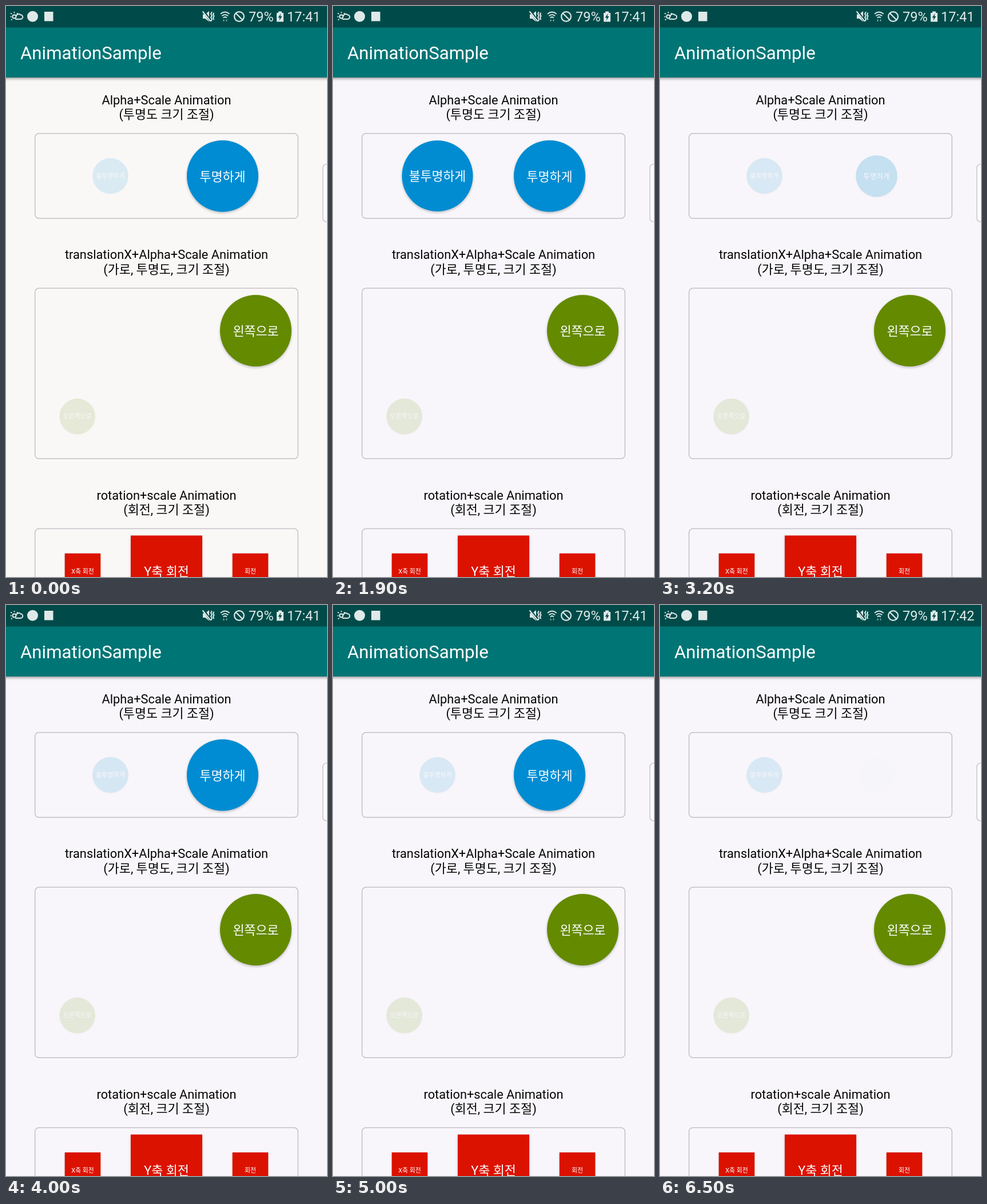
An HTML page that plays this animation: 561x998 px, repeating every 6600 ms.

```html
<!DOCTYPE html>
<html lang="ko">
<head>
<meta charset="utf-8">
<title>AnimationSample</title>
<style>
  html, body { margin: 0; width: 100%; height: 100%; overflow: hidden; background: #f8f6fa; }
  svg { display: block; width: 100%; height: 100%; }
  text { font: 21.8px Roboto, "Noto Sans CJK KR", "Noto Sans CJK", sans-serif; }
  .mid { text-anchor: middle; }
  .head { fill: #050505; }
  .label { fill: #fff; }
  .status { fill: #e2ebeb; font-size: 23.5px; }
  .icon { fill: none; stroke: #dfe9e9; stroke-width: 2; stroke-linecap: round; }
  .solid { fill: #dfe9e9; }
  .box { fill: none; stroke: #c3c1c5; stroke-width: 1.5; }
  .blue { fill: #008cd2; }
  .green { fill: #648a00; }
  .red { fill: #dc1200; }
  .lift { filter: drop-shadow(0 2.5px 2px rgba(0, 0, 0, .24)); }
  .bar { filter: drop-shadow(0 2px 2.5px rgba(0, 0, 0, .4)); }
</style>
</head>
<body>
<svg viewBox="0 0 561 998" preserveAspectRatio="none">
  <rect id="page" width="561" height="998" fill="#f8f6fa"/>

  <!-- app bar -->
  <rect class="bar" x="-10" width="581" height="125" fill="#007575"/>
  <rect width="561" height="37.5" fill="#004b49"/>
  <text x="25" y="93" fill="#fff" style="font-size:31.2px">AnimationSample</text>

  <!-- status icons -->
  <g class="icon">
    <circle cx="14.5" cy="18.5" r="3"/>
    <path d="M14.5 11v.6M9 13l.5.5M8.5 18.8h.3M9.6 24l.4-.4M20 13l-.4.4" />
    <path d="M17 23h8.5a3.6 3.6 0 0 0 0-7.5a4.6 4.6 0 0 0-7.6 1.6"/>
    <circle class="solid" cx="46.5" cy="18.3" r="8.5"/>
    <rect class="solid" x="68" y="11" width="13.5" height="14.5"/>
    <path class="solid" stroke="none" d="M344 14.5h4l7-5.5v18.500l-7-5.500h-4z"/>
    <path stroke="#004b49" stroke-width="4" d="M346 10l11 16"/>
    <path d="M344 10l13 16M359.500 11l-1.500 3l2 3l-2 3l2 3l-1.500 3M363 12.500l-1 2l1.500 3l-1.500 3l1 3"/>
    <path d="M375.500 13.500q7.300-6 14.600 0M378 17q4.800-3.800 9.600 0M380.300 20.300q2.500-2 5 0" stroke-width="1.800"/>
    <path d="M380.500 23.500v3m-1.300-1.300l1.300 1.500l1.300-1.500M385.500 27v-3m-1.300 1.300l1.300-1.500l1.300 1.500" stroke-width="1" opacity=".55"/>
    <circle cx="407.500" cy="18.500" r="8.400" stroke-width="2.200"/>
    <path d="M401.700 12.700l11.600 11.600" stroke-width="2.200"/>
    <path class="solid" stroke="none" d="M476 9.500h6v2.500h3v15.500h-12v-15.500h3z"/>
    <path fill="#004b49" stroke="none" d="M480.500 13l-5 7.500h3l-1 5l5-7.500h-3z"/>
  </g>
  <text class="status" x="424" y="27">79%</text>
  <text class="status" x="491" y="27" id="clock">17:41</text>

  <!-- edge handle -->
  <rect x="553.800" y="276.500" width="30" height="100.500" rx="6" fill="#fcfbfd" stroke="#bdbbc0" stroke-width="1.200"/>

  <!-- alpha + scale -->
  <g class="head mid">
    <text x="280.500" y="171.500">Alpha+Scale Animation</text>
    <text x="280.500" y="197">(투명도 크기 조절)</text>
  </g>
  <rect class="box" x="50.700" y="222.800" width="459.600" height="148.500" rx="7"/>
  <g id="show">
    <circle class="blue lift" r="62.500"/>
    <text class="label mid" y="8.300">불투명하게</text>
  </g>
  <g id="hide">
    <circle class="blue lift" r="62.500"/>
    <text class="label mid" y="8.300">투명하게</text>
  </g>

  <!-- translation -->
  <g class="head mid">
    <text x="280.500" y="442">translationX+Alpha+Scale Animation</text>
    <text x="280.500" y="467.500">(가로, 투명도, 크기 조절)</text>
  </g>
  <rect class="box" x="50.700" y="493.300" width="459.600" height="298" rx="7"/>
  <g transform="translate(436.500 567.500)">
    <circle class="green lift" r="62.500"/>
    <text class="label mid" y="8.300">왼쪽으로</text>
  </g>
  <g transform="translate(124.700 717.300) scale(.5)" opacity=".125">
    <circle class="green lift" r="62.500"/>
    <text class="label mid" y="8.300">오른쪽으로</text>
  </g>

  <!-- rotation -->
  <g class="head mid">
    <text x="280.500" y="862.500">rotation+scale Animation</text>
    <text x="280.500" y="888">(회전, 크기 조절)</text>
  </g>
  <rect class="box" x="50.700" y="913.500" width="459.600" height="150" rx="7"/>
  <g transform="translate(134 988) scale(.5)">
    <rect class="red lift" x="-62.500" y="-62.500" width="125" height="125"/>
    <text class="label mid" y="8.300">X축 회전</text>
  </g>
  <g transform="translate(280.500 988)">
    <rect class="red lift" x="-62.500" y="-62.500" width="125" height="125"/>
    <text class="label mid" y="8.300">Y축 회전</text>
  </g>
  <g transform="translate(427 988) scale(.5)">
    <rect class="red lift" x="-62.500" y="-62.500" width="125" height="125"/>
    <text class="label mid" y="8.300">회전</text>
  </g>
</svg>
<script>
  const LOOP = 6600, STEP = 100, RUN = 1000, FAINT = 0.125;
  const el = id => document.getElementById(id);
  const page = el('page'), clock = el('clock'), show = el('show'), hide = el('hide');

  // Sine ease in and out; each button snaps back to rest after its run.
  function progress(t, starts) {
    const start = starts.find(s => t >= s && t < s + RUN);
    return start === undefined ? 0 : (1 - Math.cos(Math.PI * (t - start) / RUN)) / 2;
  }

  const visible = q => q + q * (1 - q) / 3;

  function pose(node, x, y, scale, alpha) {
    node.setAttribute('transform', `translate(${x} ${y}) scale(${scale})`);
    node.setAttribute('opacity', alpha);
  }

  function draw() {
    const t = Math.floor(performance.now() % LOOP / STEP) * STEP;
    const grow = progress(t, [975, 3948]);
    const fade = progress(t, [2462, 5528]);
    pose(show, 182.5, 297, 0.5 + grow / 2, FAINT + (1 - FAINT) * visible(grow));
    pose(hide, 378.5, 297.2, 1 - fade / 2, visible(1 - fade));
    page.setAttribute('fill', t < 1000 ? '#faf8f7' : '#f8f6fa');
    clock.textContent = t < 5400 ? '17:41' : '17:42';
    requestAnimationFrame(draw);
  }
  draw();
</script>
</body>
</html>
```
